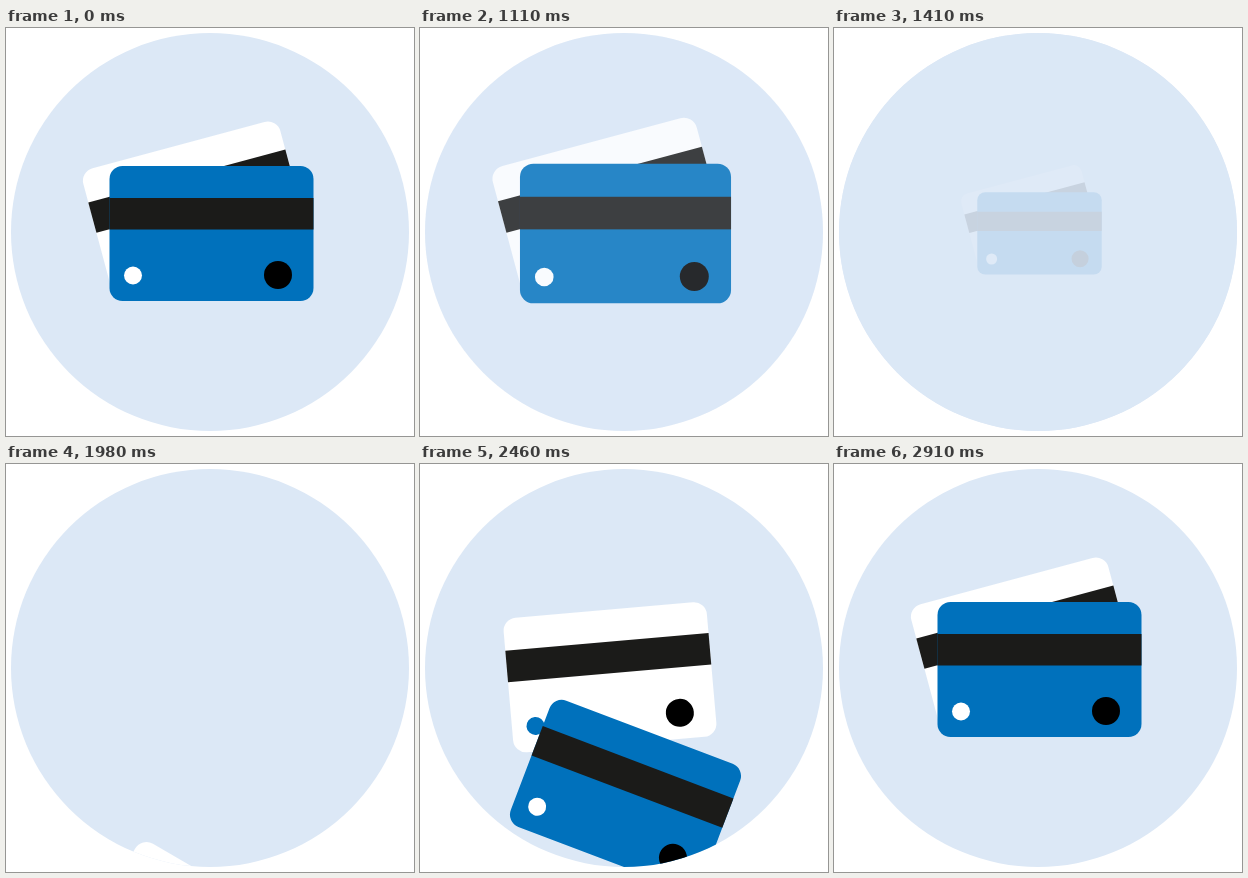
Write an HTML page with a canvas that moves like this. It is 408 by 408 pixels and loops after 3000 ms.

```html
<!DOCTYPE html>
<html lang="en">
<head>
<meta charset="utf-8">
<title>Cards</title>
<style>
  html, body { margin: 0; width: 100%; height: 100%; overflow: hidden; background: #fff; }
  canvas { display: block; width: 408px; height: 408px; }
</style>
</head>
<body>
<canvas id="stage" width="408" height="408"></canvas>
<script>
const ctx = document.getElementById('stage').getContext('2d');

const LOOP = 3000, STEP = 30;
const SKY = '#dce8f6', INK = '#1b1b19', BLUE = '#0071bc', WHITE = '#fff';
const PIVOT = { x: 205.5, y: 205.2 };

// turn: degrees still to rotate when the card starts rising
const back = { x: 190, y: 182.3, angle: -15, turn: 60, end: 2700, fill: WHITE, badge: BLUE };
const front = { x: 205.5, y: 205.5, angle: 0, turn: 45, end: 2942, fill: BLUE, badge: WHITE };

function disc(x, y, r, fill) {
  ctx.beginPath();
  ctx.arc(x, y, r, 0, Math.PI * 2);
  ctx.fillStyle = fill;
  ctx.fill();
}

function drawCard(card, dy = 0, spin = 0) {
  ctx.save();
  ctx.translate(card.x, card.y + dy);
  ctx.rotate((card.angle + spin) * Math.PI / 180);
  ctx.beginPath();
  ctx.roundRect(-102, -67.5, 204, 135, 13);
  ctx.fillStyle = card.fill;
  ctx.fill();
  ctx.fillStyle = INK;
  ctx.fillRect(-102, -35.5, 204, 31.5);
  disc(-78.5, 42, 9, card.badge);
  disc(66.5, 41.5, 14, '#000');
  ctx.restore();
}

// Decelerating rise; the spin runs evenly and eases out at the end.
function rise(card, t) {
  const s = Math.max(0, (card.end - t) / 1000);
  const dy = 538 * s ** 2 + 300 * s ** 8;
  const left = s > 0.24 ? 1.22 * s - 0.126 : 2.9 * s * s;
  drawCard(card, dy, card.turn * left);
}

// Swell a little, then shrink faster and faster.
function popScale(t) {
  const peak = 1036, top = 0.052;
  if (t < peak) {
    const u = (t - 870) / (peak - 870);
    return 1 + top * u * u * (3 - 2 * u);
  }
  return 1 + top - 3.16e-6 * (t - peak) ** 2;
}

function drawPair(scale = 1) {
  ctx.save();
  ctx.translate(PIVOT.x, PIVOT.y);
  ctx.scale(scale, scale);
  ctx.translate(-PIVOT.x, -PIVOT.y);
  drawCard(back);
  drawCard(front);
  ctx.restore();
}

function render(t) {
  ctx.fillStyle = WHITE;
  ctx.fillRect(0, 0, 408, 408);
  disc(204, 204, 199, SKY);
  ctx.save();
  ctx.beginPath();
  ctx.arc(204, 204, 199, 0, Math.PI * 2);
  ctx.clip();
  if (t < 900 || t >= 2910) {
    drawPair();
  } else if (t < 1440) {
    drawPair(popScale(t));
    // Fade both cards as one group by veiling them with the background.
    ctx.globalAlpha = ((t - 870) / 570) ** 2;
    ctx.fillStyle = SKY;
    ctx.fillRect(0, 0, 408, 408);
  } else if (t >= 1950) {
    rise(back, t);
    rise(front, t);
  }
  ctx.restore();
}

function tick() {
  const t = performance.now() % LOOP;
  render(Math.floor(t / STEP) * STEP);
  requestAnimationFrame(tick);
}
tick();
</script>
</body>
</html>
```
